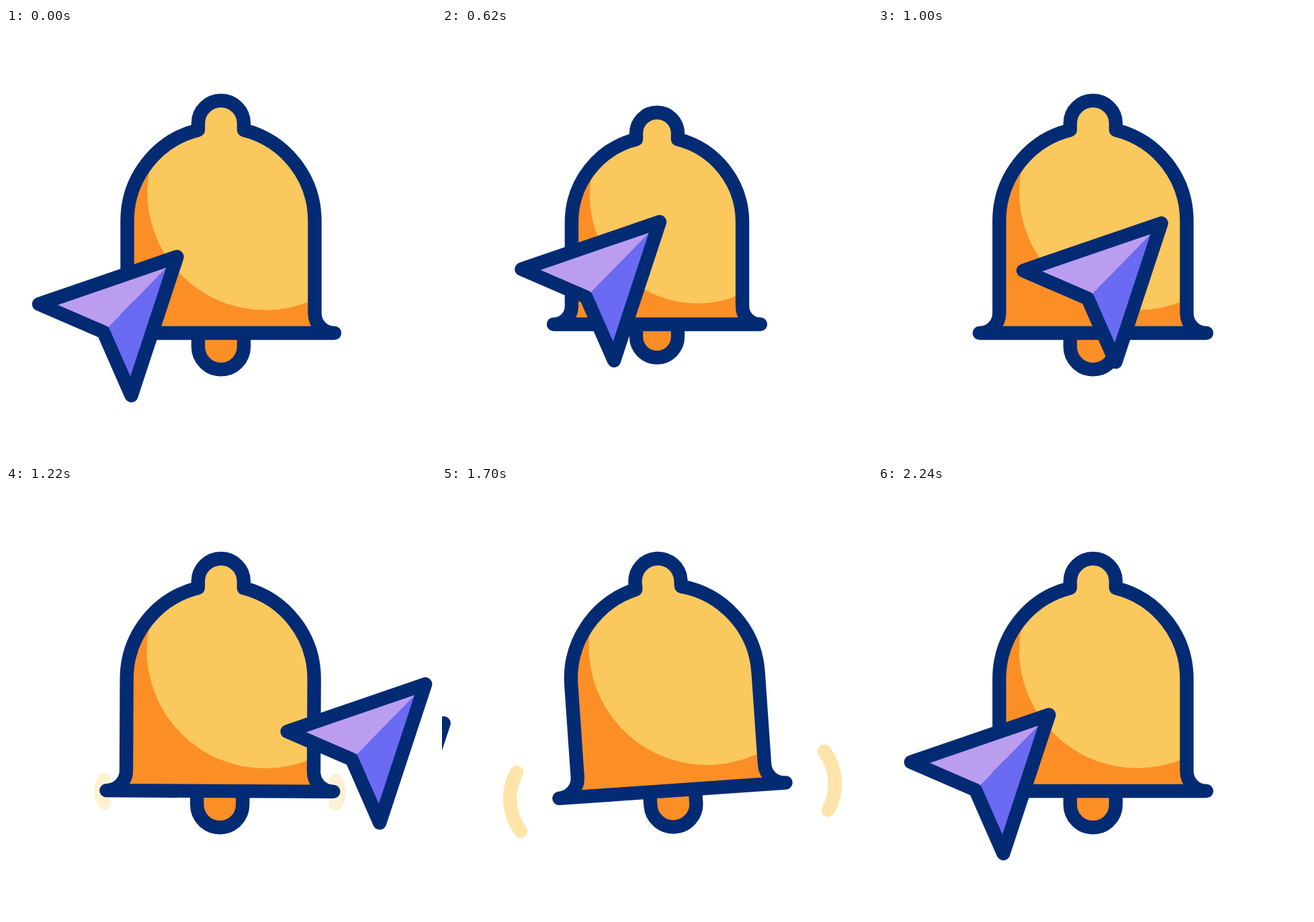
These frames come from a looping animation (640 by 640 pixels, 2.4 s). An HTML page:

```html
<!DOCTYPE html>
<html lang="en">
<head>
<meta charset="utf-8">
<title>Ringing bell</title>
<style>
  html, body { margin: 0; width: 100%; height: 100%; overflow: hidden; background: #fff; }
  svg { display: block; width: 100vw; height: 100vh; }
</style>
</head>
<body>
<svg viewBox="0 0 640 640" fill="none" stroke-width="20.4" stroke-linecap="round" stroke-linejoin="round">
  <defs>
    <path id="body" d="M151 454a29.5 29.5 0 0 0 29.5-29.5V287A139.5 139.5 0 0 1 286 151.8V142a34 34 0 0 1 68 0v9.8A139.5 139.5 0 0 1 459.5 287v137.5a29.5 29.5 0 0 0 29.5 29.5Z"/>
    <clipPath id="inside"><use href="#body"/></clipPath>
  </defs>
  <g id="swing">
    <path id="waves" stroke="#fdcb57"/>
    <g id="bell" stroke="#032b74">
      <path fill="#fb8f26" d="M286 454v20.3a34 34 0 0 0 68 0v-20.3"/>
      <use href="#body" fill="#fb8f26" stroke="none"/>
      <circle cx="386.2" cy="244" r="176" fill="#fac85d" stroke="none" clip-path="url(#inside)"/>
      <use href="#body"/>
    </g>
  </g>
  <g id="arrow">
    <path fill="#bb9df0" d="M254.5 340.5 49 411l96 41.5Z"/>
    <path fill="#6b6af2" d="M254.5 340.5 186.5 547 145 452.5Z"/>
    <path stroke="#032b74" d="M254.5 340.5 49 411l96 41.5L186.5 547Z"/>
  </g>
</svg>
<script>
const LOOP = 2400, STROKE = 20.4;
const CENTER_X = 320, CENTER_Y = 308.3, PIVOT_Y = 121, BASE_Y = 455;
const [swing, bell, waves, arrow] =
  ["swing", "bell", "waves", "arrow"].map(id => document.getElementById(id));

const clamp = v => Math.min(1, Math.max(0, v));
const progress = (t, start, end) => clamp((t - start) / (end - start));
const smooth = u => u * u * (3 - 2 * u);
const accelerate = u => u * u * (2 - u);
const mix = (a, b, u) => a + (b - a) * u;

// Eased value from [time, value] keys
function track(t, keys) {
  let value = keys[0][1];
  for (let i = 1; i < keys.length; i++) {
    const [start, from] = keys[i - 1], [end, to] = keys[i];
    if (t >= start) value = mix(from, to, smooth(progress(t, start, end)));
  }
  return value;
}

const press = [[440, 1], [620, 0.911], [780, 1]];
const ring = [[1205, 0], [1400, 15], [1513, -15], [1628, 15], [1752, -15], [1878, 0]];

function arrowOffset(t) {
  if (t < 765) {
    const u = smooth(progress(t, 202, 610));
    return [69.5 * u, -52 * u];
  }
  if (t < 1506) {
    const u = accelerate(progress(t, 765, 1504));
    return [69.5 + 570 * u, -52 + 12 * u];
  }
  const left = 1 - smooth(progress(t, 1506, 2240));
  return [-305 * left, 15.2 * left];
}

function drawWaves(t) {
  const u = smooth(progress(t, 1200, 1800));
  const half = mix(17, 46, u), offset = mix(172, 234, u);
  const sag = half * 0.29, radius = (half * half + sag * sag) / (2 * sag);
  const arc = side => `M${CENTER_X + side * offset} ${BASE_Y - half}` +
    `a${radius} ${radius} 0 0 ${side > 0 ? 1 : 0} 0 ${2 * half}`;
  waves.setAttribute("d", arc(-1) + arc(1));
  waves.setAttribute("opacity", progress(t, 1200, 1280) * (1 - progress(t, 1600, 1810)));
}

function draw(t) {
  const scale = track(t, press);
  bell.setAttribute("transform",
    `translate(${CENTER_X} ${CENTER_Y}) scale(${scale}) translate(${-CENTER_X} ${-CENTER_Y})`);
  bell.setAttribute("stroke-width", STROKE / scale);
  swing.setAttribute("transform", `rotate(${track(t, ring)} ${CENTER_X} ${PIVOT_Y})`);
  arrow.setAttribute("transform", `translate(${arrowOffset(t).join(" ")})`);
  drawWaves(t);
}

const began = performance.now();
function tick() {
  draw((performance.now() - began) % LOOP);
  requestAnimationFrame(tick);
}
tick();
</script>
</body>
</html>
```
